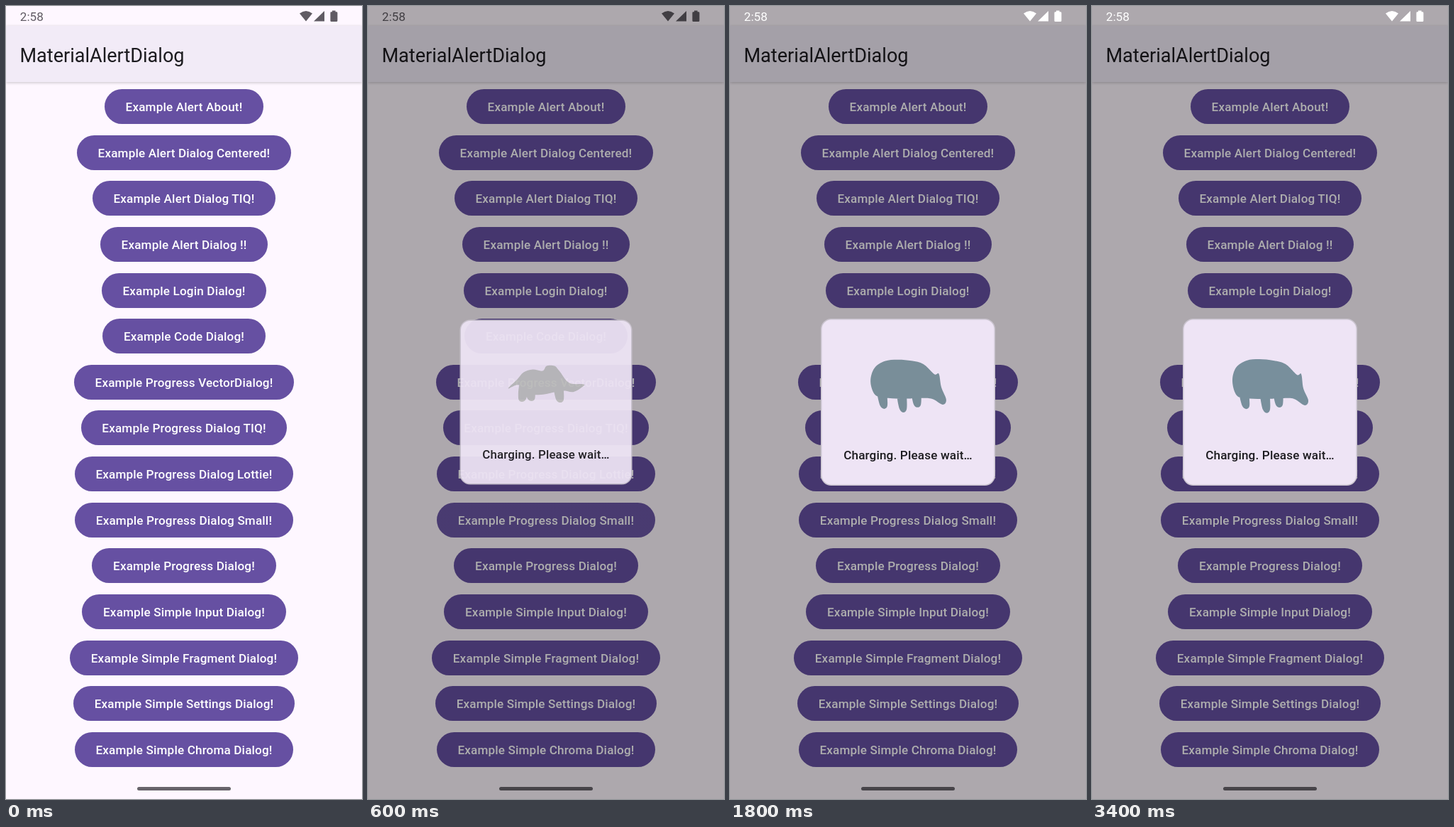
An HTML page for the animation above (3.5 s loop, 502 by 1116 pixels).

```html
<!DOCTYPE html>
<html lang="en">
<head>
<meta charset="utf-8">
<title>MaterialAlertDialog</title>
<style>
  html, body { margin: 0; width: 100%; height: 100%; overflow: hidden; }
  body { position: relative; background: #fef7ff; font-family: Roboto, sans-serif; }
  .bar { position: absolute; top: 28px; width: 100%; height: 79px; background: #f2ebf7;
         box-shadow: 0 1px 4px rgba(0, 0, 0, .22); }
  .layer { position: absolute; left: 0; top: 0; width: 502px; height: 1116px; }
  .label { font: 500 17.1px Roboto, sans-serif; letter-spacing: .16px; }
  #list { position: absolute; top: 117px; width: 502px; display: flex; flex-direction: column;
          align-items: center; gap: 15.63px; }
  .button { box-sizing: border-box; height: 49px; padding: 1px 29.7px 0; border-radius: 25px;
            background-color: #6650a2; color: #fff; line-height: 48px; white-space: nowrap; }
  .pill { position: absolute; left: 185px; top: 1099px; width: 132px; height: 5px;
          border-radius: 3px; background: #68646b; }
  #scrim { background: #000; }
  #dialog { transform-origin: 251px 557.5px; }
</style>
</head>
<body>
<div class="bar"></div>
<svg class="layer"><text x="19.5" y="79.3" font-size="27.05" fill="#1c1b1f">MaterialAlertDialog</text></svg>
<div id="list"></div>
<div class="pill"></div>
<div id="scrim" class="layer"></div>
<svg id="status" class="layer" fill="currentColor">
  <text x="19.8" y="20.7" font-size="17.1">2:58</text>
  <path d="M414 10.5Q423 3.5 432 10.5L423 21.5Z M449 7V21.5H434Z"/>
  <path d="M460 6.5h4.6v1.8h1.4q1.4 0 1.4 1.4v11q0 1.4-1.4 1.4h-7.2q-1.4 0-1.4-1.4v-11q0-1.4 1.4-1.4h1.2z"/>
</svg>
<svg id="dialog" class="layer">
  <rect x="128.75" y="440.75" width="244.5" height="233.5" rx="14" fill="#eee4f5" stroke="#cac4cf" stroke-width="1.5"/>
  <path id="animal"/>
  <text class="label" x="251" y="637.8" text-anchor="middle" fill="#1c1b1f">Charging. Please wait…</text>
</svg>
<script>
const LOOP = 3500, STEP = 100, MORPH = 300;
const $ = id => document.getElementById(id);

const names = ['Alert About', 'Alert Dialog Centered', 'Alert Dialog TIQ', 'Alert Dialog !', 'Login Dialog',
  'Code Dialog', 'Progress VectorDialog', 'Progress Dialog TIQ', 'Progress Dialog Lottie',
  'Progress Dialog Small', 'Progress Dialog', 'Simple Input Dialog', 'Simple Fragment Dialog',
  'Simple Settings Dialog', 'Simple Chroma Dialog'];
const buttons = names.map(name => {
  const button = document.createElement('div');
  button.className = 'button label';
  button.textContent = `Example ${name}!`;
  return $('list').appendChild(button);
});
const pressed = buttons[9];

// Body key points run from the tail over the back to the nose and along the belly;
// each leg is [hip x, foot x, ground y].
const hippo = {
  color: [120, 143, 156],
  body: '198,528 203,509 218,499 236,497 256,499 273,504 289,519 295,518 ' +
        '298,538 305,555 300,562 285,553 270,552 240,553 218,552 204,548',
  legs: [[212, 217, 566], [242, 246, 571], [261, 264, 564]],
};
const elephant = {
  color: [189, 189, 189],
  body: '197,538 210,525 219,515 232,511 246,513 252,506 263,506 270,513 ' +
        '284,530 304,532 304,535 290,543 274,541 250,546 230,546 212,533',
  legs: [[220, 217, 557], [227, 230, 556], [268, 271, 558]],
};
const bison = {
  color: [139, 122, 114],
  body: '201,539 209,524 222,512 240,508 256,504 268,503 278,507 288,514 ' +
        '298,515 303,539 297,546 290,554 272,548 250,550 226,542 211,534',
  legs: [[214, 215, 564], [217, 218, 561], [264, 266, 563]],
};
const morphs = [[1550, bison, hippo], [950, elephant, bison], [300, hippo, elephant]];

const clamp = x => Math.min(1, Math.max(0, x));
const mix = (a, b, p) => a.map((v, i) => v + (b[i] - v) * p);
const parse = body => body.split(' ').map(pair => pair.split(',').map(Number));

function smoothPath(points) {
  const at = i => points[(i + points.length) % points.length];
  const handle = (i, sign) => at(i).map((v, axis) => v + sign * (at(i + 1)[axis] - at(i - 1)[axis]) / 6);
  return 'M' + at(0) + points.map((_, i) => `C${handle(i, 1)} ${handle(i + 1, -1)} ${at(i + 1)}`).join('') + 'Z';
}

const leg = ([hip, foot, ground]) => smoothPath(
  [[hip - 6, 530], [hip + 6, 530], [foot + 5, ground - 3], [foot - 5, ground - 3]]);

function drawAnimal(t) {
  const [start, from, to] = morphs.find(m => t >= m[0]) || morphs[2];
  const p = (1 - Math.cos(Math.PI * clamp((t - start) / MORPH))) / 2;
  const end = parse(to.body);
  const body = parse(from.body).map((point, i) => mix(point, end[i], p));
  const legs = from.legs.map((l, i) => leg(mix(l, to.legs[i], p)));
  $('animal').setAttribute('d', smoothPath(body) + legs.join(''));
  $('animal').setAttribute('fill', `rgb(${mix(from.color, to.color, p)})`);
}

function drawRipple(t) {
  const alpha = t < 400 ? 0 : .12 * clamp((700 - t) / 300);
  const reach = t < 500 ? 150 : 400;
  pressed.style.backgroundImage = `radial-gradient(circle at 56% 50%,
    rgba(255,255,255,${alpha}) ${reach * .55}px, rgba(255,255,255,0) ${reach}px)`;
}

function draw(t) {
  const shade = .32 * clamp((t - 400) / 180);
  const grey = 96 * (1 - shade);
  const remaining = Math.exp((500 - t) / 70);
  $('scrim').style.opacity = shade;
  $('status').style.color = t < 700 ? `rgb(${grey},${grey * .95},${grey * 1.03})` : '#fff';
  $('dialog').style.opacity = t < 500 ? 0 : 1 - .26 * remaining;
  $('dialog').style.transform = `scale(${1 - .05 * remaining})`;
  drawRipple(t);
  drawAnimal(t);
}

const begin = performance.now();
function frame() {
  const t = (performance.now() - begin) % LOOP;
  draw(Math.floor(t / STEP) * STEP);
  requestAnimationFrame(frame);
}
frame();
</script>
</body>
</html>
```
